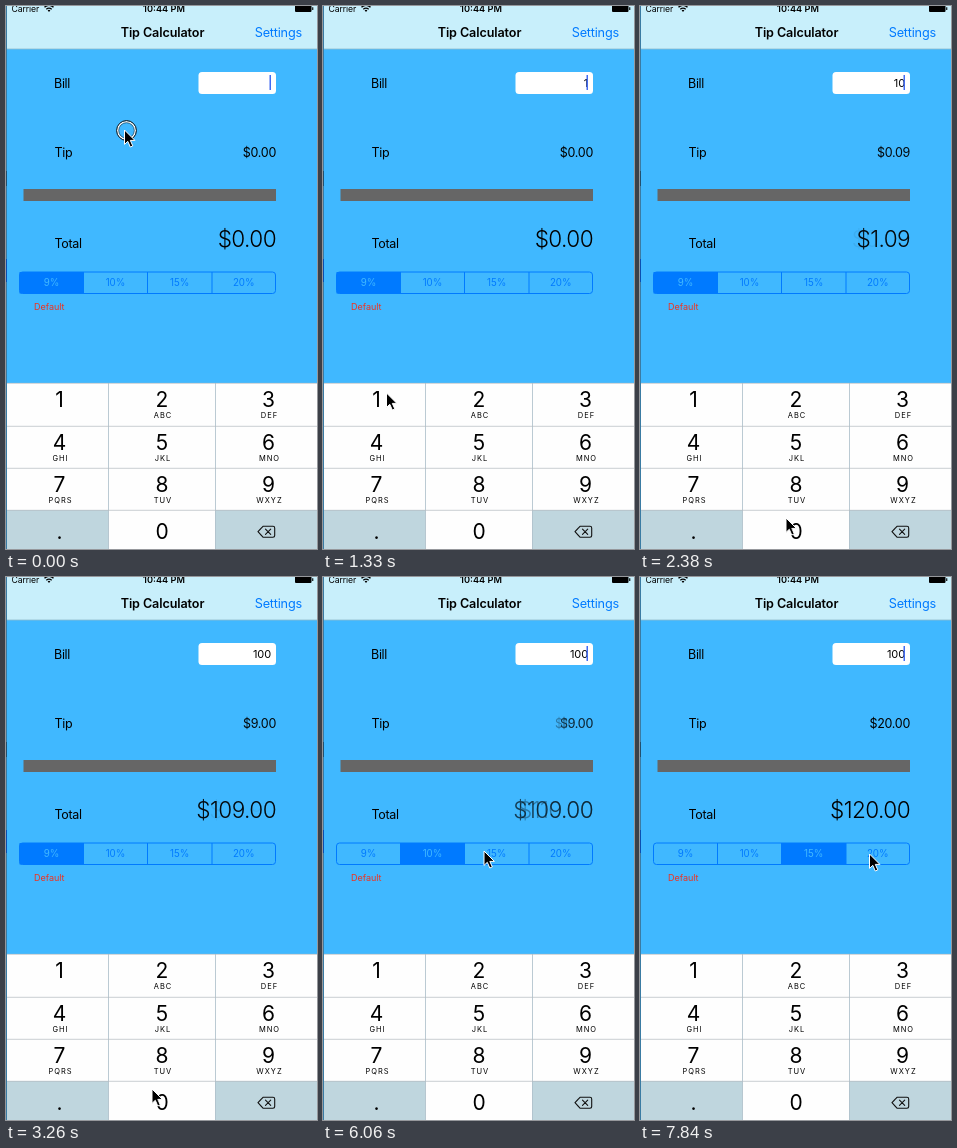
Animation, 311 px wide and 543 px high, one loop 7.99 s. Source, as an HTML page:

```html
<!DOCTYPE html>
<html lang="en">
<head>
<meta charset="utf-8">
<title>Tip Calculator</title>
<style>
  html, body { margin: 0; width: 100%; height: 100%; overflow: hidden; background: #40b8ff; }
  svg { display: block; width: 311px; height: 543px; font-family: Inter, Roboto, sans-serif; }
  .label { font-size: 12.5px; letter-spacing: -.3px; }
  .total { font-size: 22.6px; font-weight: 300; letter-spacing: -.6px; }
  .seg { font-size: 9.75px; }
  .digit { font-size: 21px; }
  .letters { font-size: 7.5px; letter-spacing: 1px; }
  .mid { text-anchor: middle; }
  .end { text-anchor: end; }
</style>
</head>
<body>
<svg id="stage" viewBox="0 0 311 543">
  <rect width="311" height="543" fill="#40b8ff"/>
  <rect width="311" height="43" fill="#c8effb"/>
  <rect y="42.6" width="311" height=".8" fill="#8fb9cb"/>

  <text x="5.5" y="6" font-size="8.7" letter-spacing="-.1">Carrier</text>
  <g fill="none" stroke="#000" stroke-width="1.3">
    <path d="M38.5 1.2Q43 -2.4 47.5 1.2M40.3 3.2Q43 1 45.7 3.2"/>
    <path d="M41.6 4.3Q43 3.2 44.4 4.3L43 6Z" fill="#000" stroke="none"/>
  </g>
  <text class="mid" x="158" y="6" font-size="9.2" font-weight="600">10:44 PM</text>
  <path d="M289 0H305.5V5Q305.5 6 304.5 6H290Q289 6 289 5ZM306.2 1.2H307.3V4H306.2Z"/>
  <text class="mid" x="156.5" y="31" font-size="12.6" font-weight="600" letter-spacing="-.1">Tip Calculator</text>
  <text class="end" x="296" y="31" font-size="12.7" letter-spacing="-.2" fill="#007aff">Settings</text>

  <text class="label" x="48" y="82">Bill</text>
  <text class="label" x="48.5" y="151">Tip</text>
  <text class="label" x="48.5" y="241.5">Total</text>
  <rect x="192.5" y="66" width="77.5" height="22" rx="3.5" fill="#fff"/>
  <text id="bill" class="end" x="265" y="80.5" font-size="11" letter-spacing="-.1"></text>
  <rect id="caret" x="263.5" y="69" width="1.5" height="15" fill="#426bf2"/>
  <rect x="17.5" y="183" width="252.5" height="12" fill="#666"/>
  <g id="sums"></g>

  <g id="segments"></g>
  <text x="28" y="304" font-size="9" fill="#f0321e">Default</text>

  <g id="keys"></g>
  <g fill="none" stroke="#111" stroke-width="1.1" stroke-linejoin="round" stroke-linecap="round">
    <path d="M252 525.7L257 520.3H267Q268.7 520.3 268.7 522V529.5Q268.7 531.2 267 531.2H257Z"/>
    <path d="M259.5 523.2L264.7 528.4M264.7 523.2L259.5 528.4"/>
  </g>

  <rect width="1" height="543" fill="#3a7ba3"/>
  <rect y="165" width="1" height="15" fill="#23506e"/>
  <rect y="253" width="1" height="23" fill="#0b4fb0"/>

  <g id="pointer">
    <g id="ring" fill="none">
      <circle cx="2" cy=".5" r="8.8" stroke="#fff" stroke-width="1.6"/>
      <circle cx="2" cy=".5" r="9.9" stroke="#111" stroke-width="1"/>
      <circle cx="2" cy=".5" r="7.8" stroke="#111" stroke-width=".5"/>
    </g>
    <path d="M0 0V14.4L3.3 11.3L5.8 17L8.3 15.9L5.8 10.4H10.4Z" stroke="#fff" stroke-width="1" stroke-linejoin="round"/>
  </g>
</svg>
<script>
const LOOP = 7990, TICKS = 54;
const BLUE = '#007aff', SKY = '#40b8ff', SHADE = '#bfd6de';
const $ = id => document.getElementById(id);

function add(parent, tag, attrs, text = '') {
  const el = document.createElementNS('http://www.w3.org/2000/svg', tag);
  for (const name in attrs) el.setAttribute(name, attrs[name]);
  el.textContent = text;
  return parent.appendChild(el);
}

// Segmented control
const edges = [13.5, 77.5, 141.5, 206, 269.5];
const segments = ['9%', '10%', '15%', '20%'].map((name, i) => {
  const x = edges[i], w = edges[i + 1] - x;
  const box = add($('segments'), 'rect', { x, y: 266, width: w, height: 21.5 });
  const text = add($('segments'), 'text', { class: 'seg mid', x: x + w / 2, y: 280.3 }, name);
  return { box, text };
});
add($('segments'), 'rect', { x: 13.5, y: 266, width: 256, height: 21.5, rx: 3, fill: 'none', stroke: BLUE });
add($('segments'), 'path', { d: edges.slice(1, 4).map(x => `M${x} 266V287.5`).join(''), stroke: BLUE });

// Keypad
const cols = [0, 102.5, 209.5, 311], rows = [377, 420, 462, 504, 543];
const centers = [53.5, 156, 262.5];
const names = [...'123456789.0', ''];
const letters = ',ABC,DEF,GHI,JKL,MNO,PQRS,TUV,WXYZ'.split(',');
const keys = {};
names.forEach((name, i) => {
  const c = i % 3, r = Math.floor(i / 3);
  keys[name] = add($('keys'), 'rect', {
    x: cols[c], y: rows[r], width: cols[c + 1] - cols[c], height: rows[r + 1] - rows[r],
    fill: i === 9 || i === 11 ? SHADE : '#fefefe'
  });
  const base = r < 3 ? rows[r] + 23.7 : 532.8;
  add($('keys'), 'text', { class: 'digit mid', x: centers[c], y: base }, name);
  if (letters[i]) add($('keys'), 'text', { class: 'letters mid', x: centers[c] + 1, y: base + 11.7 }, letters[i]);
});
add($('keys'), 'path', {
  d: 'M102.5 377V543M209.5 377V543' + rows.slice(0, 4).map(y => `M0 ${y + .3}H311`).join(''),
  stroke: '#b4bcc1', 'stroke-width': .7
});

// Old and new amounts, cross-faded
const sums = [0, 1].map(() => ({
  tip: add($('sums'), 'text', { class: 'label end', x: 270, y: 151 }),
  total: add($('sums'), 'text', { class: 'total end', x: 270, y: 241.3 })
}));

// All times below are in ticks
const path = [
  [0, 118.5, 124], [7, 63.5, 387], [9, 63.5, 387], [14, 146, 512], [22, 146, 512],
  [23, 212, 502], [28, 269, 514], [33, 269, 514], [34, 259.5, 499], [38, 108, 275],
  [39.5, 108, 275], [41, 161, 274], [45, 168, 278], [48, 168, 278], [52, 229.5, 277], [54, 229.5, 277]
];
const presses = [[8, '1'], [15, '0'], [18, '0']];
const taps = [0, 8, 15, 18, 38, 48, 52];
const picks = [[0, 0], [39, 1], [48, 2]];
const amounts = [
  [-9, 0, 0], [14.3, .09, 1.09], [17.3, .9, 10.9], [20.3, 9, 109],
  [40.4, 10, 110], [47.8, 15, 115], [51.2, 20, 120]
];

const clamp = v => Math.min(1, Math.max(0, v));
const money = v => '$' + v.toFixed(2);
const lastBefore = (list, tick) => list.findLastIndex(item => item[0] <= tick);

function pointerAt(tick) {
  const i = Math.min(lastBefore(path, tick), path.length - 2);
  const [t0, x0, y0] = path[i], [t1, x1, y1] = path[i + 1];
  const u = clamp((tick - t0) / (t1 - t0)), k = u * u * (3 - 2 * u);
  return [x0 + (x1 - x0) * k, y0 + (y1 - y0) * k];
}

// Caret stays solid after typing, then blinks
function caretAt(tick) {
  const typed = presses.reduce((last, [t]) => t <= tick ? t : last, -1);
  const p = (tick - typed - 4) / 6.76;
  if (p < 0) return 1;
  const phase = p % 1;
  return phase > .94 ? 0 : clamp((phase - .3) / .08);
}

function draw(tick) {
  $('pointer').setAttribute('transform', `translate(${pointerAt(tick)})`);
  $('ring').setAttribute('opacity', taps.includes(tick) ? 1 : 0);

  $('bill').textContent = presses.filter(([t]) => t <= tick).map(p => p[1]).join('');
  $('caret').setAttribute('opacity', caretAt(tick));
  for (const name of ['0', '1']) {
    const down = presses.some(([t, key]) => t === tick && key === name);
    keys[name].setAttribute('fill', down ? SHADE : '#fefefe');
  }

  const picked = picks[lastBefore(picks, tick)][1];
  segments.forEach(({ box, text }, i) => {
    box.setAttribute('fill', i === picked ? BLUE : 'none');
    text.setAttribute('fill', i === picked ? SKY : BLUE);
  });

  const now = lastBefore(amounts, tick);
  const mix = clamp((tick - amounts[now][0]) / 1.8);
  sums.forEach(({ tip, total }, i) => {
    const [, a, b] = amounts[Math.max(0, now - 1 + i)];
    tip.textContent = money(a);
    total.textContent = money(b);
    for (const el of [tip, total]) el.setAttribute('opacity', i ? mix : 1 - mix);
  });
}

const start = performance.now();
function frame() {
  const t = (performance.now() - start) % LOOP;
  draw(Math.min(TICKS - 1, Math.floor(t * TICKS / LOOP + .09)));
  requestAnimationFrame(frame);
}
frame();
</script>
</body>
</html>
```
